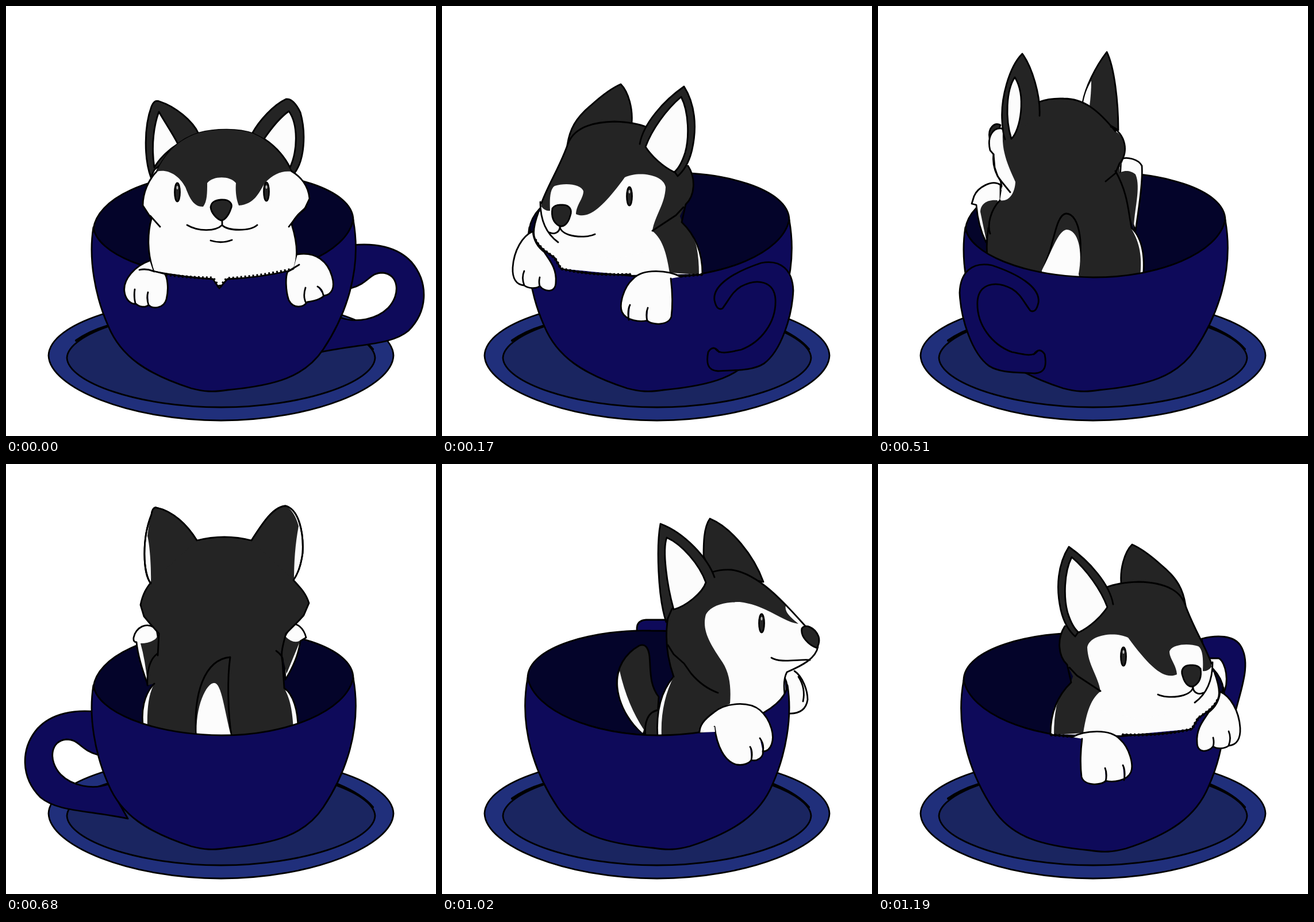
Animation of 748x748 px, one loop 1360 ms. Source, as an HTML page:

```html
<!DOCTYPE html>
<html lang="en">
<head>
<meta charset="utf-8">
<title>Husky turning in a cup</title>
<style>
html, body { margin: 0; height: 100%; overflow: hidden; background: #fff; }
svg { display: block; width: 100vw; height: 100vh; }
path, ellipse { fill: none; stroke: #000; stroke-width: 2.8; stroke-linecap: round; stroke-linejoin: round; }
.cup { fill: #0e0a5a; }
.inside { fill: #04042a; }
.dish { fill: #202f7b; }
.well { fill: #1a2560; }
.dark { fill: #242424; }
.white { fill: #fcfcfc; }
.flat { stroke: none; }
.thick { stroke-width: 4; }
.fur { stroke-width: 5; stroke-dasharray: 3 4; stroke-linecap: butt; }
.glint { fill: #bbb; stroke: none; }
.pose { display: none; }
</style>
</head>
<body>
<svg viewBox="0 0 748 748">
<defs>
  <path id="rim" class="inside" d="M152 388C158 338 240 290 390 290C480 287 606 316 604 374C592 430 490 472 375 472C250 470 158 430 152 388Z"/>
  <path id="front" class="cup" d="M152 385C143 440 155 505 178 557C200 610 245 640 322 665C345 671 360 672 385 668C470 660 520 645 552 597C590 540 620 460 604 372C592 430 490 472 375 472C250 470 158 430 152 385Z"/>
  <path id="sideHandle" class="cup" d="M602 416C640 412 680 418 705 445C735 480 735 530 700 565C670 590 620 587 548 602L582 542C610 552 645 545 665 525C688 500 682 466 655 464C632 464 632 482 600 491Z"/>
  <path id="frontHandle" class="cup" d="M488 526Q478 531 474 512C470 485 510 462 555 447C590 440 610 460 611 495C609 540 590 600 560 622C540 635 510 633 480 635C460 634 460 618 463 602Q472 588 482 602L476 597C484 607 500 602 520 598C555 585 582 550 580 510C578 480 550 472 520 488C505 497 500 510 488 526Z"/>
  <g id="eye">
    <ellipse class="dark" rx="4.5" ry="16"/>
    <ellipse class="glint" cy="-8" rx="1.5" ry="3"/>
  </g>

  <g id="quarter">
    <use href="#rim"/><use href="#front"/>
    <path class="dark" d="M218 242C222 215 232 195 260 172Q290 145 311 136C325 150 332 180 330 203L225 238Z"/>
    <path class="white flat" d="M168 358C158 385 156 398 162 406C170 422 185 430 196 438L207 457L325 468L453 466C453 430 442 400 418 378L400 340Z"/>
    <path class="dark flat" d="M219 240C228 215 255 202 300 201Q335 202 357 211L428 278C442 300 440 330 424 345L414 365L366 391L195 390L173 370V343C185 310 205 280 219 240Z"/>
    <path class="white flat" d="M188 356C187 335 188 318 196 313C215 307 242 310 246 322C246 335 234 345 233 362C255 372 280 350 318 298C340 287 385 292 389 315C388 345 370 365 366 391L385 420L300 440L190 420L165 395L172 348Q180 358 188 356Z"/>
    <path class="dark flat" d="M365 391L410 355L418 377C434 393 442 412 443 420Q447 440 447 467L396 464C392 440 386 405 365 391Z"/>
    <path d="M219 240C228 215 255 202 300 201Q335 202 357 211M219 240C205 280 185 310 173 343M428 278C442 300 440 330 424 345L417 376C442 400 453 430 453 466M420 350L407 364L366 391M171 341C171 370 180 395 202 411M168 358C158 385 158 398 162 406M205 384C205 394 195 398 187 394M205 384C208 402 250 405 266 397"/>
    <path class="dark" d="M208 346C222 345 227 355 223 365C219 380 210 386 203 382C193 376 190 365 192 352Q197 345 208 346Z"/>
    <use href="#eye" x="326" y="331"/>
    <path class="dark" d="M344 240C350 205 385 165 421 140C440 170 444 210 435 250Q428 280 410 296L405 289L355 243"/>
    <path class="white" d="M354 245C365 215 390 180 416 158C430 185 430 230 423 255Q415 280 404 289C385 280 365 262 354 245Z"/>
    <path d="M162 406C170 422 185 430 196 438L207 457Q260 469 328 467M415 470L453 467"/>
    <path class="fur" d="M162 406C170 422 185 430 196 438L207 457Q260 469 328 467M415 470L453 467"/>
    <path class="white" d="M158 392C140 400 125 425 123 455C122 475 130 485 143 486C150 492 165 492 170 487C178 498 198 500 198 480C200 455 185 440 178 428Q160 415 158 392M143 486Q138 472 143 461M170 487Q168 480 170 472"/>
    <path class="white" d="M415 471C395 460 350 455 332 475C315 490 308 520 313 532C320 548 345 550 357 547C365 556 395 556 399 540C402 515 400 490 398 474M325 546Q322 530 327 520M357 548Q354 535 358 525"/>
  </g>

  <g id="profile">
    <path class="white" d="M140 360C125 370 117 395 117 410C120 430 135 435 152 434L158 370M133 370Q120 390 125 413"/>
    <use href="#rim"/>
    <path class="dark" d="M194 205C210 160 250 110 287 95C298 110 298 140 298 160L285 190Z"/>
    <path class="dark" d="M376 405C392 385 390 360 392 335Q395 310 410 316C435 330 450 355 449 385C445 420 425 455 403 468L380 470Z"/>
    <path class="white flat" d="M444 360C452 385 445 430 404 468L402 462C420 435 435 400 444 360Z"/>
    <path class="dark" d="M376 428C395 430 402 450 399 475H370Z"/>
    <path class="white" d="M350 370C372 395 381 430 378 475H340Z"/>
    <path class="white flat" d="M97 305C100 290 130 270 155 246C190 210 215 190 245 186L283 186L300 300L300 475L193 440L155 402L157 370C140 357 103 340 99 318Z"/>
    <path class="dark flat" d="M155 246C190 210 220 188 250 184Q268 183 283 186L357 252C366 290 363 325 358 345L350 370C365 400 373 435 371 475L310 472C295 435 270 425 252 417C250 390 252 365 265 345C285 315 302 290 294 262C285 245 260 240 235 240C190 245 160 275 133 278C145 268 158 258 155 246Z"/>
    <path d="M120 283C150 250 200 190 250 184Q268 183 283 188M99 318C103 338 125 350 153 362Q160 375 157 400M113 341C130 339 165 347 180 337M357 252C366 290 364 330 350 370M360 315L350 331L332 347L320 364Q300 388 273 398"/>
    <path class="dark" d="M98 300C105 283 122 278 127 286C130 300 115 315 101 320Q95 310 98 300Z"/>
    <use href="#eye" x="197" y="277"/>
    <path class="dark" d="M279 197C290 165 330 120 373 104C380 140 378 230 363 275L353 252L294 207"/>
    <path class="white" d="M294 206C305 175 335 140 362 128C370 150 362 210 350 253C330 248 300 225 294 206Z"/>
    <use href="#front"/>
    <path class="white" d="M305 467C305 455 298 445 280 432C260 415 220 412 200 428Q186 440 180 460C174 480 180 500 195 500C193 510 205 518 215 515C218 520 228 525 240 523C262 518 275 490 279 457M195 500Q192 488 200 477M215 515Q212 500 217 492"/>
    <path class="white flat" d="M279 457L305 467L278 466Z"/>
  </g>

  <g id="behind">
    <use href="#rim"/>
    <g transform="matrix(-1 0 0 1 753 -4)">
      <path class="white" d="M330 270C320 266 300 270 294 282C292 310 300 360 305 395L333 320Z"/>
      <path class="dark flat" d="M305 297C315 288 330 290 335 297L325 340L308 392C308 360 295 320 305 297Z"/>
      <path class="white" d="M540 315C555 305 580 320 586 335L590 348L582 350C580 375 575 395 565 415L540 350Z"/>
      <path class="dark flat" d="M545 342C565 340 575 350 575 362L564 415L550 400Z"/>
      <path class="dark" d="M540 211C550 206 562 215 559 234L545 225Z"/>
      <path class="white" d="M538 217C552 215 564 230 558 255L552 262C555 285 545 300 540 308L536 325L540 340L512 330V240Z"/>
      <path class="white flat" d="M514 310L537 318L541 343Q515 345 514 310Z"/>
      <path class="dark" d="M335 220C335 170 342 110 355 84C375 110 392 145 397 172L360 205Z"/>
      <path class="white flat" d="M382 134C390 148 394 160 396 172L385 178Q382 155 382 134Z"/>
      <path class="dark flat" d="M347 215C370 185 395 165 430 165Q455 164 473 171L536 225C538 260 525 285 514 310C515 330 525 345 541 342C560 350 565 370 561 390C567 420 563 450 562 482H295C288 440 292 410 312 390C315 360 325 330 332 310L333 285C320 265 318 235 340 222Z"/>
      <path d="M340 222C370 185 395 165 430 165Q455 164 473 171M348 214C322 225 316 260 333 278L340 295L357 309M340 291C318 330 318 360 312 390C292 410 288 440 292 480M552 262L550 285L545 300L536 312L523 328M541 342C558 360 563 385 558 400M561 390Q566 420 562 450"/>
      <path class="white flat" d="M312 392C294 410 290 440 293 475L297 475C293 440 298 415 312 392Z"/>
      <path class="dark" d="M472 195C470 160 485 110 502 87C525 110 540 165 537 205Q536 225 532 236"/>
      <path class="white" d="M515 128C530 150 532 200 521 235C505 220 495 160 515 128Z"/>
      <path class="dark" d="M402 480L406 466C395 430 400 365 426 365C440 367 445 400 450 415C455 440 465 450 468 480Z"/>
      <path class="white flat" d="M404 470C396 430 405 393 425 393C440 395 450 430 468 464L468 480H402Z"/>
    </g>
    <use href="#front"/>
  </g>
</defs>

<path class="dish" d="M74 608C76 664 215 721 374 721S672 664 674 608C672 552 533 508 374 508S76 552 74 608Z"/>
<path class="well" d="M106 612C108 655 232 698 374 698S640 655 642 612C640 570 516 528 374 528S108 570 106 612Z"/>
<path class="thick" d="M122 582Q145 566 175 557M577 557Q620 575 638 597"/>

<g class="pose">
  <use href="#sideHandle"/><use href="#rim"/><use href="#front"/>
  <path class="dark" d="M252 298C240 265 240 210 253 175Q258 162 267 166C295 175 325 200 335 222L258 285Z"/>
  <path class="white" d="M258 281C252 240 258 205 266 184C278 205 290 222 299 240C280 252 265 268 258 281Z"/>
  <path class="dark" d="M500 293C520 270 522 220 512 185Q500 160 487 162C465 172 440 200 428 222L495 285Z"/>
  <path class="white" d="M494 281C508 250 508 205 492 183C475 195 460 215 449 231C470 245 485 263 494 281Z"/>
  <path class="white" d="M262 288C278 255 300 232 335 221C365 213 405 213 430 222C460 235 482 258 496 287C512 296 526 312 528 335L519 354C508 362 500 372 497 380C508 415 508 440 500 459Q440 473 385 475L371 491L360 475Q310 472 257 462C245 430 246 395 253 370L238 347C238 325 248 302 262 288Z"/>
  <path class="dark flat" d="M262 288C278 255 300 232 335 221C365 213 405 213 430 222C460 235 482 258 496 288C480 286 465 292 450 308C440 325 432 345 405 347C400 335 399 320 400 308C390 295 360 295 350 308C350 325 350 340 343 349C325 350 318 330 312 315C300 293 280 283 262 288Z"/>
  <path d="M251 365L268 384M522 350L508 363L492 384M376 373V381C365 392 335 393 315 381M376 381C385 392 425 392 437 381M356 408Q375 414 393 407"/>
  <path class="fur" d="M278 467Q320 473 360 473L371 490L384 474Q440 471 497 458"/>
  <path class="dark" d="M374 337C390 336 395 345 391 353C387 365 380 373 374 373C366 370 357 360 356 350C357 340 365 338 374 337Z"/>
  <use href="#eye" x="298" y="324"/><use href="#eye" x="453" y="323"/>
  <path class="white" d="M250 443C225 452 203 475 206 497C208 512 218 519 226 518C232 524 243 525 248 520C255 528 275 526 279 510C284 490 280 470 276 466L256 461M225 517Q222 505 224 493M248 520Q244 508 247 498"/>
  <path d="M258 462Q245 456 232 459"/>
  <path class="white" d="M507 432C540 427 560 445 567 470C573 490 567 502 553 504C548 510 537 513 524 515C517 525 500 527 492 512C486 495 486 470 490 462L500 457M522 517Q516 505 521 490M552 503Q550 492 542 488"/>
  <path d="M490 462L510 450"/>
</g>

<g class="pose"><use href="#quarter"/><use href="#frontHandle"/></g>

<g class="pose">
  <use href="#profile"/>
  <path class="cup" d="M358 493C375 487 400 487 411 494C416 500 414 520 411 560L403 640C400 655 390 658 370 657C350 657 347 650 347 630L349 520Q350 500 358 493Z"/>
</g>

<g class="pose"><use href="#behind"/><use href="#frontHandle" transform="matrix(-1 0 0 1 753 4)"/></g>

<g class="pose">
  <use href="#sideHandle" transform="matrix(-1 0 0 1 760 15)"/><use href="#rim"/>
  <path class="white" d="M222 302C225 285 245 272 262 288L264 300L247 385Q230 340 227 310Q221 310 222 302Z"/>
  <path class="dark flat" d="M234 312Q255 312 264 300L266 335L250 365L246 380Q242 340 234 312Z"/>
  <path class="white" d="M522 302C518 285 505 275 497 280L485 300L484 340L486 375Q508 340 512 308Z"/>
  <path class="dark flat" d="M486 300Q500 314 512 307L488 365L480 330Z"/>
  <path class="white" d="M252 208C238 190 236 130 253 88Q255 74 262 76C290 82 315 105 332 133"/>
  <path class="dark flat" d="M250 95Q255 76 262 76C290 82 315 105 332 133L340 200L252 208C253 180 250 140 246 125Z"/>
  <path class="white" d="M427 133C445 105 465 73 487 73C510 80 518 120 516 155Q512 185 500 202"/>
  <path class="dark flat" d="M427 133C445 105 465 73 487 73Q502 82 509 108C503 140 501 170 501 204L420 200Z"/>
  <path class="dark flat" d="M332 133Q380 121 427 133L500 202C512 215 522 225 527 242L518 265L487 295C480 320 475 330 481 345L484 390C500 405 507 430 508 460L505 475H240C235 440 240 400 258 382L246 385C245 360 250 340 263 330L266 295L240 265L234 245C238 225 245 215 252 206Z"/>
  <path class="white flat" d="M258 382C240 400 234 430 239 462H246C245 425 248 400 258 382ZM484 390C500 400 508 430 508 458L500 460C498 430 495 410 484 390Z"/>
  <path d="M252 208C238 190 236 130 253 88Q255 74 262 76C290 82 315 105 332 133Q380 121 427 133C445 105 465 73 487 73C510 80 518 120 516 155Q512 185 500 202C512 215 522 225 527 242L518 263L510 272L487 295C480 320 478 330 481 345M470 325Q484 335 481 345L484 390C500 400 508 430 508 460M252 206C245 215 238 225 234 245L240 265L250 277L266 295L264 333M263 330C250 340 245 360 246 385M258 382C240 400 234 430 239 462"/>
  <path class="dark" d="M331 475C325 400 345 340 390 336C385 370 385 430 393 478Z"/>
  <path class="white flat" d="M332 475C328 420 350 380 362 381C375 380 380 430 392 475Z"/>
  <use href="#front"/>
</g>

<g class="pose">
  <path class="cup" d="M215 312C190 298 165 294 145 297C115 303 105 330 108 365C112 405 130 440 150 460L148 405C138 390 138 365 145 350C155 333 165 333 180 329Z"/>
  <use href="#behind" transform="matrix(-1 0 0 1 753 4)"/>
</g>

<g class="pose">
  <path class="cup" d="M339 310V285Q340 272 355 271H390Q404 272 405 285V310Z"/>
  <use href="#profile" transform="matrix(-1 0 0 1 753 0)"/>
</g>

<g class="pose">
  <path class="cup" d="M563 304C590 297 618 298 630 315C650 345 632 390 622 430L600 400C612 380 605 345 593 338L570 338Z"/>
  <use href="#quarter" transform="matrix(-1 0 0 1 753 4)"/>
</g>
</svg>
<script>
const HOLD = 170;
const poses = document.querySelectorAll('.pose');

function draw() {
  const current = Math.floor(performance.now() / HOLD) % poses.length;
  poses.forEach((pose, i) => { pose.style.display = i === current ? 'inline' : 'none'; });
  requestAnimationFrame(draw);
}
draw();
</script>
</body>
</html>
```
